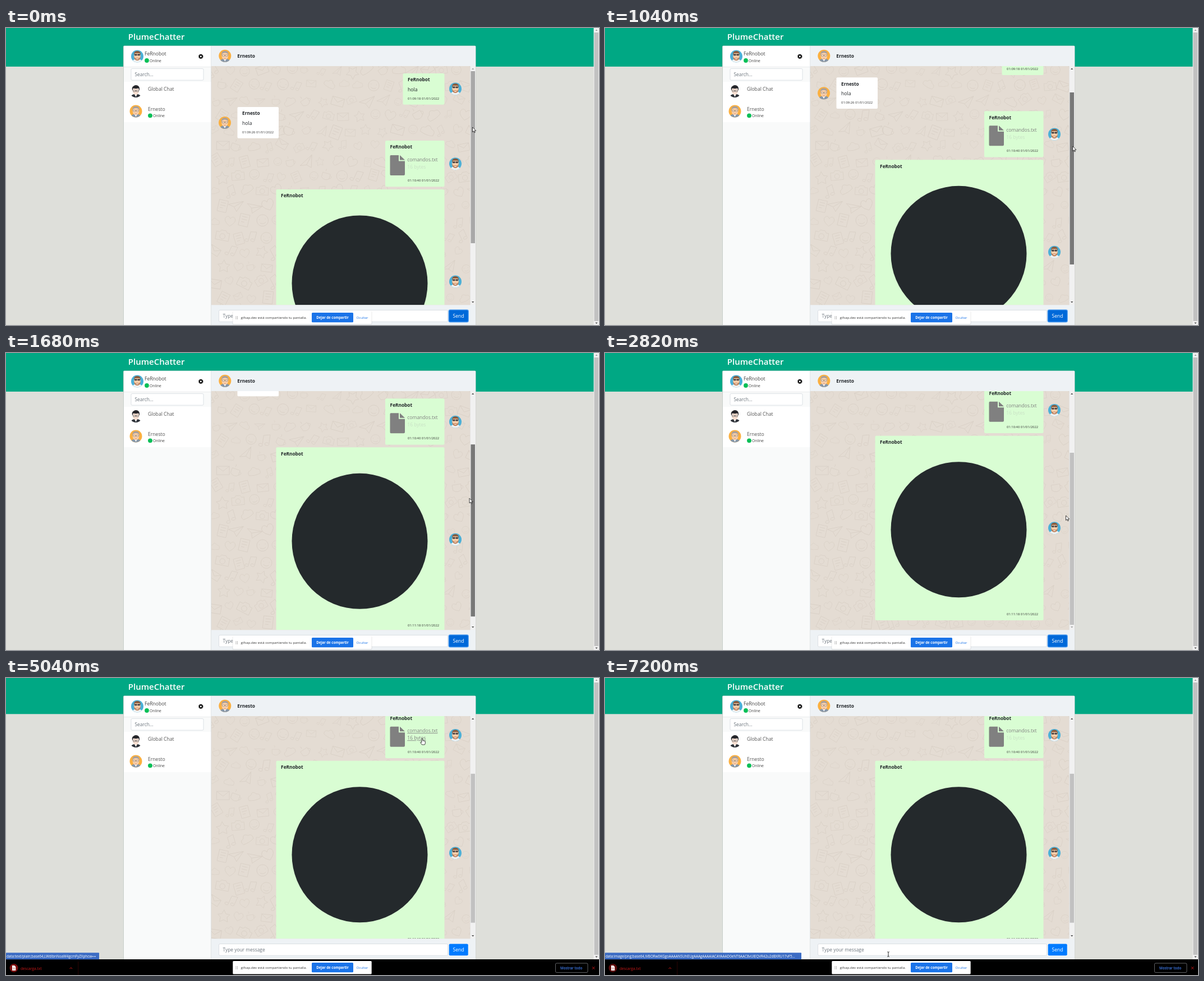
Recreate the animation shown at these times as an HTML page. Size 1057 by 530 pixels, loop 7.28 s.

```html
<!DOCTYPE html>
<html lang="en">
<head>
<meta charset="utf-8">
<title>Chat file download</title>
<style>
  html, body { margin: 0; width: 100%; height: 100%; overflow: hidden; background: #dedfda; }
  svg { display: block; width: 1057px; height: 530px; }
  text { font-family: "Open Sans", "Noto Sans", sans-serif; white-space: pre; }
  .hover text { text-decoration: underline; text-decoration-thickness: .6px; text-underline-offset: .8px; }
</style>
</head>
<body>
<svg id="stage" viewBox="0 0 1057 530"></svg>
<script>
const LOOP = 7280, STEP = 80;
const CONTENT = 566.5, TOP = 68, TRACK_TOP = 77;
const USER = 'FeRnobot', FRIEND = 'Ernesto';

const uri = (type, body) => ['data', `${type};base64,${body}`].join(':');
const FILE_URI = uri('text/plain', 'LWdlbnNoaW4gcmFyZXphcw==');
const IMAGE_URI = uri('image/png',
  'iVBORw0KGgoAAAANSUhEUgAAAgAAAAIACAYAAAD0eNT6AAC8vUlEQVR42u2dBXRU17vF5...');

// Markup helpers
const rect = (x, y, w, h, fill, extra = '') =>
  `<rect x="${x}" y="${y}" width="${w}" height="${h}" fill="${fill}" ${extra}/>`;
const circle = (x, y, r, fill, extra = '') =>
  `<circle cx="${x}" cy="${y}" r="${r}" fill="${fill}" ${extra}/>`;
const path = (d, fill, extra = '') => `<path d="${d}" fill="${fill}" ${extra}/>`;
const text = (x, y, str, size = 8.6, fill = '#212529', weight = 400, extra = '') =>
  `<text x="${x}" y="${y}" font-size="${size}" fill="${fill}" font-weight="${weight}" ${extra}>${str}</text>`;
const avatar = (kind, x, y) => `<use href="#${kind}" x="${x}" y="${y}"/>`;
const online = (x, y) => circle(x, y, 3.9, '#06bf56') + text(x + 5, y + 2.6, 'Online', 6.8, '#444');
const arrow = (id, x, y, dir) =>
  path(`M${x - 2.2} ${y + dir}h4.4l-2.2 ${-2.4 * dir}z`, '#505050', `id="${id}"`);
const bubble = (x, y, w, h, fill, name, stamp) =>
  rect(x, y, w, h, fill, 'rx="2"') + text(x + 8.6, y + 14.4, name, 8.3, '#212529', 700) +
  text(Math.max(x + 8.6, x + w - 65.5), y + h - 9.3, stamp + ' 01/01/2022', 5.9, '#333');

function doodles() {
  let seed = 11;
  const rnd = () => (seed = seed * 16807 % 2147483647) / 2147483647;
  const shapes = [
    'M-9-6h18v12h-18zM-9-6l9 7 9-7',
    'M-8 0a8 8 0 1 0 16 0a8 8 0 1 0-16 0M-4-2v1M4-2v1M-4 3q4 3 8 0',
    'M-7-9h14v18h-14zM-4-5h8M-4-1h8M-4 3h5',
    'M-4 8V-7l9-2V5M-4 8a3 2 0 1 1-1-3M5 5a3 2 0 1 1-1-2',
    'M0 8Q-13-1-6-7Q-2-9 0-4Q3-9 7-6Q12 0 0 8z',
    'M-10-5h5l2-3h7l2 3h4v12h-20zM-4 1a4 4 0 1 0 8 0a4 4 0 1 0-8 0',
    'M-9 4q-3-7 4-8q3-8 9-1q7 0 5 8q-9 3-18 1z',
    'M0-9l3 6 6 1-4 4 1 7-6-3-6 3 1-7-4-4 6-1z',
    'M-8-4h13v8q-6 6-13 0zM5-2q6 2 0 6M-4-7q2-2 0-4',
    'M-11 1l21-9-7 17-5-6zM-2 3l12-11'
  ];
  let out = '';
  for (let row = 0; row < 17; row++) for (let col = 0; col < 18; col++) {
    const x = 370 + col * 27 + (row % 2) * 12 + rnd() * 7, y = 72 + row * 27 + rnd() * 7;
    const shape = shapes[Math.floor(rnd() * shapes.length)];
    out += path(shape, 'none',
      `transform="translate(${x.toFixed(1)} ${y.toFixed(1)}) rotate(${Math.round(rnd() * 70 - 35)}) scale(${(0.8 + rnd() * 0.5).toFixed(2)})"`);
  }
  return `<g stroke="#d9d0c6" stroke-width=".7" stroke-linejoin="round">${out}</g>`;
}

const suit = color => path('M-8 7.6Q-6 5-2.5 5h5Q6 5 8 7.6Q5 11 0 11T-8 7.6z', color);
const face = '<ellipse cy="-.6" rx="5.9" ry="7.4" fill="#fad0ab"/>';
const glasses = (fill, stroke, y = -2) =>
  path(`M-4.7 ${y}h3.9v2.6h-3.9zM.8 ${y}h3.9v2.6h-3.9zM-.8 ${y + .8}h1.6`, fill, `stroke="${stroke}" stroke-width=".5"`);

const defs = `<defs>
  <g id="user">${circle(0, 0, 11, '#4bb0d8')}${suit('#eef1f2')}${face}
    ${path('M-5.9-2Q-7-9.5 0-9.5T5.9-2L4.6-5.5H-4.6z', '#8a5a3c')}
    ${path('M-5.9 0Q-5.5 7.6 0 7.6T5.9 0L3.6 3.4Q0 2-3.6 3.4z', '#c07f58')}
    ${path('M-2 4.600h4', 'none', 'stroke="#fff" stroke-width="1.2"')}${glasses('#4d4545', '#4d4545', -4)}</g>
  <g id="friend">${circle(0, 0, 11, '#fbb040')}${suit('#8797a8')}${path('M-2.500 5h5L0 10z', '#fff')}${face}
    ${path('M-6 0Q-7.500-9 0-9T6 0L4.800-4Q0-7-4.800-4z', '#aaa09a')}
    ${glasses('#fde6d2', '#75604f')}${path('M-2 4q2 1.400 4 0', 'none', 'stroke="#b87058" stroke-width=".6"')}</g>
  <g id="group">${suit('#30343b')}${path('M-2.500 5h5L0 10z', '#fff')}
    <ellipse cy="-.6" rx="5.4" ry="7" fill="#f8e0d2"/>
    ${path('M-6-1Q-8.500-7-4-9.500Q1-12.500 5-9Q7.500-6 6-1L4.800-5.500Q0-4-4.800-5.500z', '#25252a')}
    ${glasses('#fbeee6', '#222')}</g>
  <clipPath id="view">${rect(366, TOP, 461.5, 426.3, '#000', 'id="viewClip"')}</clipPath>
  <clipPath id="statusClip">${rect(0, 0, 346, 12, '#000')}</clipPath>
</defs>`;

const sidebar =
  rect(210, 32, 155.5, 510, '#f9fafa') + rect(210, 32, 155.5, 37, '#fff') +
  rect(210, 69, 155.5, .7, '#e3e5e7') + rect(210, 96, 155.5, 72, '#fff') +
  avatar('user', 234, 50.5) + text(247, 49.2, USER, 8.6, '#444') + online(251, 58) +
  circle(347.3, 50.8, 2.5, 'none', 'stroke="#111" stroke-width="2"') +
  circle(347.3, 50.8, 3.6, 'none', 'stroke="#111" stroke-width="1.3" stroke-dasharray="1.7 1.13"') +
  rect(223, 72.5, 129, 20.7, '#fff', 'rx="2" stroke="#ced4da" stroke-width=".7"') +
  text(229.5, 86.2, 'Search...', 8.4, '#6c757d') +
  avatar('group', 231.5, 113) + text(253, 112, 'Global Chat', 8.6, '#555') +
  avatar('friend', 231.5, 148.5) + text(253, 147.5, FRIEND, 8.6, '#555') + online(257, 156.3);

const GREEN = '#d9fdd3';
const messages =
  bubble(707.5, 81, 74, 55.8, GREEN, USER, '01:09:18') + text(716, 113, 'hola') + avatar('user', 801, 108.5) +
  bubble(412.5, 141, 73.5, 55.8, '#fff', FRIEND, '01:09:26') + text(421, 173, 'hola') + avatar('friend', 390, 169) +
  bubble(676, 201, 105.5, 82.3, GREEN, USER, '01:10:40') + avatar('user', 801, 242.3) +
  path('M686 227h14v10.5h11V261q0 2-2 2h-23q-1.5 0-1.5-2v-32q0-2 1.5-2zM702 227l9 8.5h-9z', '#808080') +
  `<g id="link">${text(715.3, 237.6, 'comandos.txt', 8.5, '#808080')}
    ${text(715.3, 250.6, '16 bytes', 8.5, '#c9e2c5', 400, 'id="bytes"')}</g>` +
  bubble(481.5, 288, 300, 329.3, GREEN, USER, '01:11:18') +
  circle(630.5, 455.5, 121, '#24292c') + avatar('user', 801, 452.5);

const chat =
  rect(366, 32, 471, 36, '#eef2f5') + rect(366, TOP, 461.5, 427, '#e4dcd3') +
  avatar('friend', 390.3, 49.8) + text(412.3, 53, FRIEND, 8.3, '#212529', 700) +
  `<g clip-path="url(#view)">${doodles()}<g id="messages">${messages}</g></g>` +
  rect(827.5, TOP, 9.5, 430, '#f1f1f1') + arrow('upArrow', 832.2, 73, 1) +
  rect(828.5, TRACK_TOP, 7.5, 307, '#a8a8a8', 'id="thumb"') +
  `<g id="footer">${rect(366, 494.3, 471, 50, '#eef2f5')}${arrow('downArrow', 832.2, 489, -1)}
    ${rect(379.5, 503.5, 408, 20.7, '#fff', 'rx="2" stroke="#ced4da" stroke-width=".7"')}
    ${text(386.5, 517.3, 'Type your message', 8.4, '#6c757d')}
    ${rect(789.7, 503.5, 34, 20.7, '#007bff', 'rx="2" id="send" stroke-width="2.4" paint-order="stroke"')}
    ${text(796.5, 517.2, 'Send', 8.6, '#fff')}</g>`;

const pageScroll = rect(1047.5, 0, 9.5, 530, '#f1f1f1') + path('M1050.5 5h4l-2-2.4z', '#999') +
  rect(1048.5, 8, 7.5, 515, '#c1c1c1', 'id="pageThumb"') + arrow('pageArrow', 1052.5, 526.5, -1);

const shelf = `<g id="shelf">${rect(0, 502, 1057, 32, '#000')}
  ${circle(14, 517.5, 7.5, '#7d0f0f', 'id="pulse"')}
  ${path('M11 513h4l2.3 2.3v6.7H11z', '#fff')}
  ${path('M12.3 517.5h3.6M12.3 519.5h3.6', 'none', 'stroke="#b55" stroke-width=".7"')}
  ${text(26, 520.7, 'descarga.txt', 6.6, '#c81818')}
  ${path('M113.5 519l2.3-2.3 2.3 2.3M1045 515.3l4.4 4.4M1049.4 515.3l-4.4 4.4', 'none', 'stroke="#c81818"')}
  ${rect(128.5, 506, .7, 24, '#3c0808')}
  ${rect(979.5, 509, 57.5, 16.5, 'none', 'rx="2" stroke="#8a8d91" stroke-width=".7"')}
  ${text(988, 519.8, 'Mostrar todo', 6.2, '#3f7df0', 600)}</g>`;

const status = `<g id="status">${rect(0, 0, 166, 12, '#3c6cc4', 'id="statusBox" rx="1"')}
  <g clip-path="url(#statusClip)">${text(1, 8.3, '', 6.3, '#fff', 400, 'id="statusText"')}</g></g>`;

const shareBar = rect(403.7, 505.3, 248.6, 24, '#0002', 'rx="2"') + rect(404.3, 505, 247.4, 23.6, '#fff', 'rx="1.5"') +
  path('M410 514v6M412.5 514v6', 'none', 'stroke="#aaa" stroke-width=".8"') +
  text(418.5, 519, 'gifcap.dev está compartiendo tu pantalla.', 6.1, '#333') +
  rect(545, 508, 74, 17.2, '#1a73e8', 'rx="1.5"') +
  text(582, 519, 'Dejar de compartir', 6.1, '#fff', 700, 'text-anchor="middle"') +
  text(624.5, 519, 'Ocultar', 6.1, '#1a73e8');

const outline = 'stroke="#111" stroke-width=".8" stroke-linejoin="round"';
const pointers = `<g id="pointer">
  ${path('M0 0V8.6L2 6.8 3.4 9.8 4.8 9.2 3.4 6.3H6.2z', '#fff', `id="arrow" ${outline}`)}
  ${path('M-1 5V.8Q0-.6 1 .8V4Q2 3.3 2.7 4.3Q3.7 3.6 4.2 4.7Q5.3 4.3 5.3 6V8Q5.3 9.5 4.3 11H-.6Q-1.5 9.5-3.5 7Q-3.2 5.6-1 7z', '#fff', `id="hand" ${outline}`)}
  ${path('M-1.8-4.3Q0-4.3 0-3.3Q0-4.3 1.8-4.3M0-3.3V3.3M-1.8 4.3Q0 4.3 0 3.3Q0 4.3 1.8 4.3', 'none', 'id="beam" stroke="#111" stroke-width=".9"')}</g>`;

document.getElementById('stage').innerHTML = defs + rect(0, 0, 1057, 530, '#dedfda') +
  rect(0, 0, 1048, 68.9, '#00a884', 'id="banner"') +
  text(217.8, 21.2, 'PlumeChatter', 15, '#fff', 600) +
  rect(209, 31.5, 628.5, 520, '#c9ceca', 'rx="2"') + sidebar + chat + rect(365.3, 32, .7, 510, '#dfe3e6') +
  pageScroll + shelf + status + shareBar + pointers;

// Motion: time, x, y, eased
const mouse = [
  [0, 831.5, 177], [320, 834.5, 173], [400, 834.5, 173], [1040, 833.7, 211], [1280, 831, 230],
  [1680, 826, 259.3], [2000, 823.5, 268], [2480, 821.5, 290], [3200, 821.5, 290], [3280, 820.8, 290],
  [3600, 820.8, 290], [4160, 742, 108, true], [5360, 742, 108], [5440, 741.3, 107.3],
  [6560, 741.3, 107.3], [7200, 505, 493, true]
];
const clamp = (v, lo, hi) => Math.min(hi, Math.max(lo, v));
const ramp = (t, from, to) => clamp((t - from) / (to - from), 0, 1);

function mouseAt(t) {
  const i = mouse.findIndex(key => key[0] > t);
  if (i < 0) return mouse[mouse.length - 1].slice(1, 3);
  const a = mouse[i - 1], b = mouse[i];
  let p = ramp(t, a[0], b[0]);
  if (b[3]) p = p * p * (3 - 2 * p);
  return [a[1] + (b[1] - a[1]) * p, a[2] + (b[2] - a[2]) * p];
}

const el = {};
document.querySelectorAll('[id]').forEach(node => el[node.id] = node);
const set = (id, attrs) => Object.entries(attrs).forEach(([k, v]) => el[id].setAttribute(k, v));
const move = (id, x, y) => set(id, { transform: `translate(${x} ${y})` });
const show = (id, on) => set(id, { visibility: on ? 'visible' : 'hidden' });

function render(time) {
  const t = Math.floor(time / STEP) * STEP;
  const [x, y] = mouseAt(t);
  const open = ramp(t, 4720, 4960), lift = 29 * open;

  // Scrolling follows the drag of the thumb
  const viewH = 426.3 - lift, track = 408 - lift;
  const thumbH = track * viewH / CONTENT;
  const dragged = t < 400 ? 0 : t < 2480 ? clamp(y - 173, 0, 101.2) : 101.2;
  const scroll = dragged / 101.2 * 140.3;
  const limit = CONTENT - viewH;
  set('thumb', {
    y: TRACK_TOP + scroll / limit * (track - thumbH), height: thumbH,
    fill: t < 240 ? '#a8a8a8' : t < 2720 ? '#787878' : '#c1c1c1'
  });
  set('upArrow', { fill: scroll > 0 ? '#505050' : '#a3a3a3' });
  set('downArrow', { fill: scroll < limit - .5 ? '#505050' : '#a3a3a3' });
  set('viewClip', { height: viewH });
  move('messages', 0, -scroll);

  // Window shrinks as the download shelf opens
  move('footer', 0, -lift);
  move('shelf', 0, 28.5 * (1 - open));
  show('shelf', open > 0);
  set('banner', { height: 68.9 - 4.6 * open });
  set('pageThumb', { height: 515 - lift });
  move('pageArrow', 0, -lift);
  const focused = t < 4640;
  set('send', { fill: focused ? '#0069d9' : '#007bff', stroke: focused ? '#5fa6f2' : 'none' });
  set('pulse', { opacity: .5 + .5 * Math.cos((t - 5030) / 1000 * 2 * Math.PI) });

  const onFile = t > 3600 && x < 770 && x > 684 && y > 87 && y < 124;
  const onImage = t > 6560 && x > 495 && x < 766 && y > 180 && y < 450;
  const onInput = t > 6560 && y > 474;
  set('link', { class: onFile ? 'hover' : '' });
  set('bytes', { fill: onFile ? '#808080' : '#c9e2c5' });

  show('status', t >= 4320);
  move('status', 0, 521.5 - 31.2 * open);
  set('statusBox', { width: t < 5200 ? 166 : 350 });
  el.statusText.textContent = t > 6560 && y > 180 ? IMAGE_URI : FILE_URI;

  move('pointer', x, y);
  show('hand', onFile || onImage);
  show('beam', onInput);
  show('arrow', !(onFile || onImage || onInput));
}

let start;
function frame(now) {
  start ??= now;
  render((now - start) % LOOP);
  requestAnimationFrame(frame);
}
render(0);
requestAnimationFrame(frame);
</script>
</body>
</html>
```
